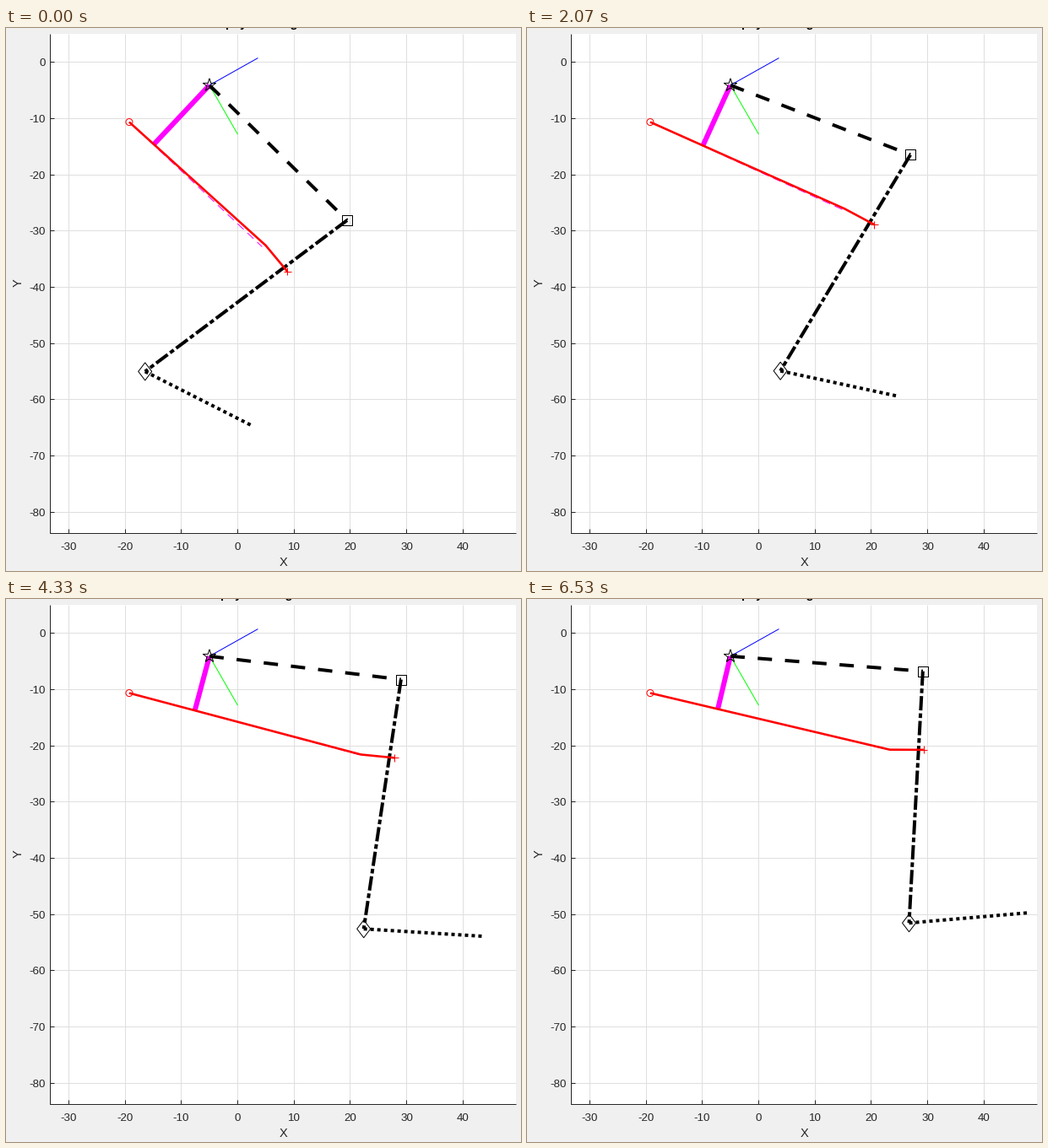
A matplotlib script that plays this animation: 610 by 644 pixels, repeating every 6.79 s.

```python
import numpy as np
import matplotlib.pyplot as plt
from matplotlib.animation import FuncAnimation

W, H, DPI = 610, 644, 100
PX = 72 / DPI
LOOP, STEP = 6790, 35
plt.rcParams["font.family"] = "Liberation Sans"
plt.rcParams["lines.scale_dashes"] = False

# each pose holds 4 ticks of 1/15 s, now and then only 3
SHORT = {0, 4, 7, 13, 16, 20, 22, 25}
TICKS = np.cumsum([2] + [3 if k in SHORT else 4 for k in range(26)])
CHANGES = TICKS * 1000 / 15 // 10 * 10

PERIOD = 10.18  # poses per gait cycle
HIP = np.array([240.5, 67.3])
ORIGIN = np.array([145.5, 111.0])
THIGH, SHANK, FOOT = 228.6, 299, 141
INK = "#262626"


def wave(phase, mean, *harmonics):
    """Fourier series with (cos, sin) weights."""
    return mean + sum(a * np.cos(n * phase) + b * np.sin(n * phase)
                      for n, (a, b) in enumerate(harmonics, 1))


def angles(pose):
    """Thigh, shank and foot angle in degrees below +X."""
    p = 2 * np.pi * pose / PERIOD
    return (wave(p, 31.2, (15.3, 27.1), (-2.2, 3.4), (0.2, -0.4)),
            wave(p, 131.8, (9.1, 33.75), (2.55, -4.85), (-0.3, 0.5)),
            wave(p, 25.4, (14.4, 34.0), (-12.5, 1.6), (-0.4, -1.75)))


def unit(deg):
    r = np.radians(deg)
    return np.array([np.cos(r), np.sin(r)])


def toward(p, q):
    d = q - p
    return d / np.hypot(*d)


# integer coordinates are pixel centres, nudged so that snapping rounds down
fig = plt.figure(figsize=(W / DPI, H / DPI), dpi=DPI, facecolor="#f0f0f0")
ax = fig.add_axes([0, 0, 1, 1])
ax.set_xlim(-0.45, W - 0.45)
ax.set_ylim(H - 0.55, -0.55)
ax.axis("off")


def line(points, color, width=1, dashes=None, z=3):
    x, y = np.transpose(points)
    ln, = ax.plot(x, y, color=color, lw=width * PX, zorder=z,
                  solid_capstyle="butt", solid_joinstyle="round")
    if dashes:
        ln.set_dashes([d * PX for d in dashes])
    return ln


def label(x, y, s, px=13.33, **kw):
    kw = {"color": INK, "va": "baseline", **kw}
    return ax.text(x, y, s, fontsize=px * PX, **kw)


def place(ln, points):
    ln.set_data(*np.transpose(points))


# plot area
LEFT, RIGHT, TOP, BOTTOM = 52, 604, 6, 598
ax.fill([LEFT, RIGHT, RIGHT, LEFT], [TOP, TOP, BOTTOM, BOTTOM],
        color="white", lw=0, zorder=0)
for v in range(-30, 41, 10):
    x = round(274 + 6.67 * v)
    line([(x, TOP), (x, BOTTOM)], "#dfdfdf", z=1)
    line([(x, BOTTOM - 5), (x, BOTTOM)], INK, z=2)
    label(x, 618, str(v), ha="center")
for v in range(-80, 1, 10):
    y = round(39.2 - 6.67 * v)
    line([(LEFT, y), (RIGHT, y)], "#dfdfdf", z=1)
    line([(LEFT, y), (LEFT + 5, y)], INK, z=2)
    label(46.5, y + 5.5, str(v), ha="right")
line([(LEFT, TOP), (LEFT, BOTTOM), (RIGHT, BOTTOM)], INK, z=2)
label(328, 637, "X", 14.67, ha="center")
label(14, 302, "Y", 14.67, ha="center", va="center", rotation=90)
title = label(254, -1.3, "payload angle", 14.67, color="black", weight="bold")

# fixed frame and marker outlines
line([HIP, (298, 35)], "blue")
line([HIP, (274, 125.5)], "#00ff00")
ring = np.array([unit(a) for a in np.linspace(0, 360, 41)])
star = np.array([unit(-90 + 36 * i) * (3.05 if i % 2 else 8)
                 for i in range(11)])
square = 6 * np.sqrt(2) * np.array([unit(45 + 90 * i) for i in range(5)])
diamond = np.array([unit(90 * i) for i in range(5)]) * (8, 10.5)

nil = [(0, 0), (0, 0)]
arm = line(nil, "magenta", 6, z=4)
thigh = line(nil, "black", 4, (17, 15.4), z=5)
shank = line(nil, "black", 4, (17, 3.5, 5.5, 3.5), z=5)
foot = line(nil, "black", 4, (4, 4), z=5)
chord = line(nil, "magenta", 1, (10, 6), z=6)
muscle = line(nil, "red", 2.6, z=7)
plus = [line(nil, "red", z=8) for _ in range(2)]
knee_mark = line(nil, "black", z=8)
ankle_mark = line(nil, "black", z=8)
line(HIP + star, "black", z=8)
line(ORIGIN + 4 * ring, "red", z=8)


def draw(i):
    now = i * STEP + STEP - 1
    a, b, c = angles(np.searchsorted(CHANGES, now, side="right"))

    knee = HIP + THIGH * unit(a)
    ankle = knee + SHANK * unit(b)
    place(thigh, [HIP, knee])
    place(shank, [knee, ankle])
    place(foot, [ankle, ankle + FOOT * unit(c)])
    place(knee_mark, knee + square)
    place(ankle_mark, ankle + diamond)

    # muscle bends at a point fixed to the shank, then inserts on it
    along, side = unit(b), unit(b - 90)
    end = knee + 93 * along + 6 * side
    bend = knee + 95 * along - 34 * side
    place(muscle, [ORIGIN, bend, end])
    for ln, arms in zip(plus, [(4.5, 0), (0, 4.5)]):
        place(ln, [end - arms, end + arms])

    # line of action and its moment arm about the hip
    d = toward(ORIGIN, bend)
    tip = bend - 2 * d + min(4, a / 11) * np.array([-d[1], d[0]])
    d = toward(ORIGIN, tip)
    place(chord, [ORIGIN, tip])
    place(arm, [HIP, ORIGIN + d * np.dot(HIP - ORIGIN, d)])

    title.set_x(260 if a > 36.5 else 254)
    return []


anim = FuncAnimation(fig, draw, frames=LOOP // STEP, interval=STEP,
                     init_func=lambda: draw(0), repeat=True, repeat_delay=0,
                     blit=False)
plt.show()
```
